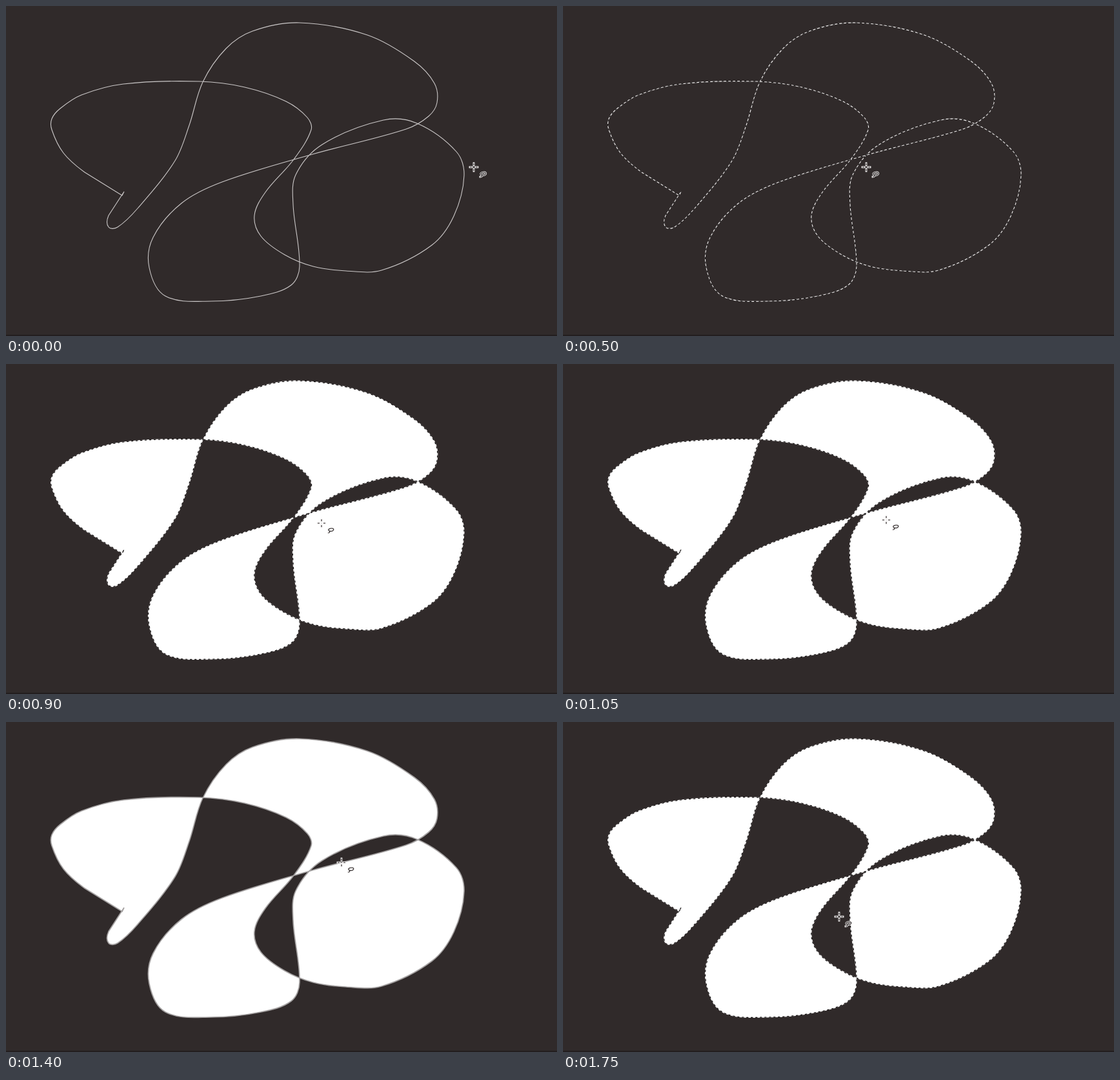
An HTML page that plays this animation: 854x512 px, repeating every 1.8 s.

```html
<!DOCTYPE html>
<html lang="en">
<head>
<meta charset="utf-8">
<title>Lasso selection</title>
<style>
  html, body { margin: 0; width: 100%; height: 100%; overflow: hidden; background: #302a2a; }
  svg { display: block; width: 854px; height: 512px; }
  path { fill: none; }
</style>
</head>
<body>
<svg viewBox="0 0 854 512">
  <defs>
    <g id="icon">
      <path d="M-6 0h3M3 0h3M0-6v3M0 3v3"/>
      <path d="M10 15q4 0 2-3c-3-2 0-4 4-4c5 0 3 6-4 4"/>
    </g>
  </defs>
  <rect y="510" width="854" height="2" fill="#231e1f"/>
  <path id="shape" style="fill:#fff" fill-rule="evenodd"/>
  <path id="line"/>
  <path id="ants" stroke="#141212" stroke-width="1.2" stroke-dasharray="3.2 3.8"/>
  <g id="cursor">
    <use href="#icon" stroke="#f4f2f2" stroke-width="2.8" stroke-linecap="square"/>
    <use href="#icon" stroke="#282323" stroke-width="1.1"/>
    <rect x="-.5" y="-.5" width="1" height="1" fill="#aaa"/>
  </g>
</svg>
<script>
const LOOP = 1800, STEP = 50, FILL_AT = 600;

const outline = `183 288,180 294,122 258,89 228,71 192,71 175,84 159,117 138,182 121,
300 117,370 126,434 148,467 173,473 192,446 238,402 289,385 325,395 357,432 386,
476 404,527 411,582 410,660 371,694 326,710 263,698 226,637 182,585 177,490 215,
449 262,445 308,455 404,442 433,395 450,318 458,247 450,222 406,228 359,272 306,
335 273,475 230,620 191,655 171,668 150,664 120,633 86,560 45,455 26,382 39,
341 66,305 118,284 185,262 240,204 314,173 343,159 343,159 325`
  .split(",").map(pair => pair.trim().split(" ").map(Number));

// Closed curve whose handles scale with each segment, so tight turns stay tight.
function smoothPath(points) {
  const at = i => points[(i + points.length) % points.length];
  const handle = (i, length) => {
    const [ax, ay] = at(i - 1), [bx, by] = at(i + 1);
    const scale = length / Math.hypot(bx - ax, by - ay);
    return [(bx - ax) * scale, (by - ay) * scale];
  };
  let d = "M" + points[0];
  points.forEach(([x, y], i) => {
    const [nx, ny] = at(i + 1);
    const length = Math.hypot(nx - x, ny - y) / 3;
    const sharp = i < 2 || i === points.length - 1;
    const [ux, uy] = sharp ? [0, 0] : handle(i, length);
    const [vx, vy] = sharp ? [0, 0] : handle(i + 1, length);
    d += `C${x + ux} ${y + uy} ${nx - vx} ${ny - vy} ${nx} ${ny}`;
  });
  return d + "Z";
}

const linear = u => u;
const easeOut = u => 1 - (1 - u) ** 2;
const easeInOut = u => u * u * (3 - 2 * u);

const cursorKeys = [
  { t: 0, x: 725, y: 250, ease: easeOut },
  { t: 500, x: 470, y: 250, ease: linear },
  { t: 600, x: 470, y: 250, ease: linear },
  { t: 900, x: 489, y: 247, ease: linear },
  { t: 1150, x: 509, y: 239, ease: linear },
  { t: 1400, x: 520, y: 218, ease: easeInOut },
  { t: 1750, x: 428, y: 302 }
];

function cursorAt(t) {
  const next = cursorKeys.findIndex(key => key.t > t);
  if (next < 0) return cursorKeys[cursorKeys.length - 1];
  const a = cursorKeys[next - 1], b = cursorKeys[next];
  const u = a.ease((t - a.t) / (b.t - a.t));
  return { x: a.x + (b.x - a.x) * u, y: a.y + (b.y - a.y) * u };
}

const antSpans = [[100, 600], [750, 1150], [1650, LOOP]];
const [shape, line, ants, cursor] =
  ["shape", "line", "ants", "cursor"].map(id => document.getElementById(id));
const d = smoothPath(outline);
for (const path of [shape, line, ants]) path.setAttribute("d", d);

const show = (node, on) => node.setAttribute("visibility", on ? "visible" : "hidden");

function draw(time) {
  const t = Math.floor(time % LOOP / STEP) * STEP;
  const filled = t >= FILL_AT;
  const marching = antSpans.some(([from, to]) => t >= from && t < to);
  show(shape, filled);
  show(ants, marching);
  line.setAttribute("stroke", marching ? "#f2f0f0" : filled ? "#a5a2a2" : "#cbc8c8");
  line.setAttribute("stroke-width", filled && !marching ? 1.7 : 1.1);
  ants.setAttribute("stroke-dashoffset", -Math.floor(t / 100));
  const { x, y } = cursorAt(t);
  cursor.setAttribute("transform", `translate(${Math.round(x)} ${Math.round(y)})`);
}

const start = performance.now();
function tick() {
  draw(performance.now() - start);
  requestAnimationFrame(tick);
}
tick();
</script>
</body>
</html>
```
